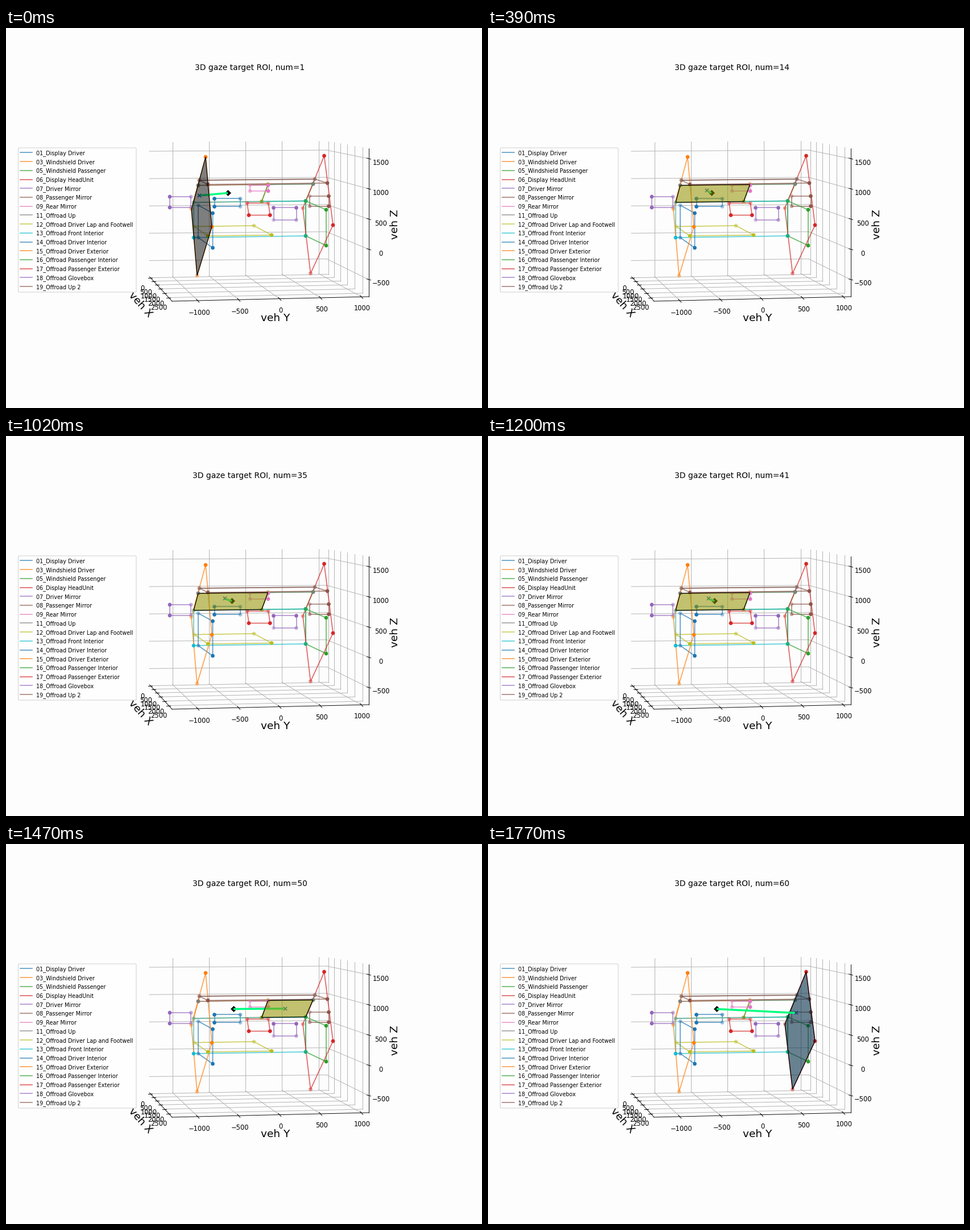
These frames come from a looping animation (837 by 669 pixels, 1800 ms). A matplotlib script:

```python
import matplotlib.pyplot as plt
import numpy as np
from matplotlib.animation import FuncAnimation
from matplotlib.patches import FancyBboxPatch, Polygon

W, H, DPI = 837, 669, 83
FRAMES, INTERVAL = 60, 30

plt.rcParams["font.family"] = "DejaVu Sans"
fig = plt.figure(figsize=((W + 0.01) / DPI, (H + 0.01) / DPI), dpi=DPI,
                 facecolor="#fdfdfd")
ax = fig.add_axes([0, 0, 1, 1])
ax.set(xlim=(0, W), ylim=(H, 0))
ax.axis("off")


def line(p, q, color="#b0b0b0", lw=0.8, z=1, **kw):
    ax.plot([p[0], q[0]], [p[1], q[1]], color=color, lw=lw, zorder=z, **kw)


def label(x, cy, s, size=10, ha="center"):
    """Text whose capitals are centred on cy."""
    return ax.text(x, cy + 0.365 * size * DPI / 72, s, size=size, ha=ha,
                   va="baseline", zorder=9)


def mix(p, q, t):
    return np.add(p, np.multiply(np.subtract(q, p), t))


def smooth(n, start, end):
    t = np.clip((n - start) / (end - start), 0, 1)
    return t * t * (3 - 2 * t)


# Corners of the box: floor and the tops of the two walls
BACK_L, BACK_R = (252.5, 438), (564, 432)
FRONT_L, FRONT_R = (292, 481), (637.5, 473)
TOP_L, TOP_R, TOP_F = (252.5, 201), (564, 199), (637.5, 212)


def draw_axes():
    # z levels run along both walls
    for i in range(5):
        left, mid, right = 217 + 48.1 * i, 215 + 47.9 * i, 230 + 53.2 * i
        line((252, left), (564, mid))
        line((564, mid), (637.5, right))
        line((634.5, right - 1), (641.5, right + 1), "k")
        label(659, 236.3 + 54 * i - 0.2 * i * i,
              f"{1500 - 500 * i}".replace("-", "−"))
    # y positions on the back wall and floor
    for i in range(5):
        t = (40 + 64.3 * i) / 311.5
        top, back = mix(TOP_L, TOP_R, t), mix(BACK_L, BACK_R, t)
        front = mix(FRONT_L, FRONT_R, 0.131 + 0.2083 * i)
        line(top, back)
        line(back, front)
        line(front - (2.5, 2.5), front + (2.5, 3), "k")
        label(339.7 + 71.7 * i, 501 - 2 * i,
              f"{500 * i - 1000}".replace("-", "−"))
    # x positions on the floor and right wall
    for i in range(6):
        t = 0.04 + 0.134 * i + 0.0057 * i * i
        left, right = mix(BACK_L, FRONT_L, t), mix(BACK_R, FRONT_R, t)
        line(left, right)
        line(right, mix(TOP_R, TOP_F, t))
        line(left - (4, 0), left + (3, 0), "k")
        label(240 + 5.8 * i, 457.5 + 6.9 * i, str(500 * i))
    for p, q in [(BACK_L, FRONT_L), (FRONT_L, FRONT_R), (FRONT_R, TOP_F)]:
        line(p, q, "k")
    label(473.5, 509.5, "veh Y", 16)
    ax.text(684, 346, "veh Z", size=16, rotation=90, ha="center", va="center")
    ax.text(236.5, 487.5, "veh X", size=16, rotation=-48, ha="center",
            va="center", rotation_mode="anchor", zorder=9)


def panel(x, y, w, h, near, skew=0):
    """Small four-sided panel, its corners listed from the near side on."""
    pts = [(x, y), (x + w, y), (x + w + skew, y + h), (x + skew, y + h)]
    k = ["top", "right", "bottom", "left"].index(near)
    return pts[k:] + pts[:k]


# Cabin corners shared between regions
DASH_L, DASH_R = (330, 307), (527, 304.5)
FLOOR_L, FLOOR_R = (330, 369), (527, 366)
HEAD_L, HEAD_R = (338, 277), (540, 274.5)
ROOF_L, ROOF_R = (340, 268), (543, 266)
REAR_L, REAR_R = (355, 275.5), (565, 273)
SPLIT = 0.607
HEAD_M, DASH_M = mix(HEAD_L, HEAD_R, SPLIT), mix(DASH_L, DASH_R, SPLIT)

# Each outline starts with its two nearest corners
REGIONS = {
    "01_Display Driver": panel(366.5, 300.5, 45.5, 14, "left"),
    "03_Windshield Driver": [HEAD_L, HEAD_M, DASH_M, DASH_L],
    "05_Windshield Passenger": [HEAD_R, DASH_R, DASH_M, HEAD_M],
    "06_Display HeadUnit": panel(424, 308.3, 37.3, 21.2, "bottom", skew=3),
    "07_Driver Mirror": panel(288, 297, 37.3, 19, "left"),
    "08_Passenger Mirror": panel(534, 296, 33.5, 17.7, "right"),
    "09_Rear Mirror": panel(429, 276.7, 32, 10.3, "right"),
    "11_Offroad Up": [HEAD_L, HEAD_R, ROOF_R, ROOF_L],
    "12_Offroad Driver Lap and Footwell":
        [REAR_L + np.array([0, 90.5]), (467, 364.5), (436, 348), (331, 349.5)],
    "13_Offroad Front Interior": [FLOOR_L, FLOOR_R, DASH_R, DASH_L],
    "14_Offroad Driver Interior":
        [(363.5, 326), (363.5, 387), (338, 369), (338, 312)],
    "15_Offroad Driver Exterior":
        [(351, 227), (362, 350), (336, 436), (326, 319)],
    "16_Offroad Passenger Interior":
        [(563, 320), (563, 383), FLOOR_R, DASH_R],
    "17_Offroad Passenger Exterior":
        [(559.5, 225), (575, 347), (535.5, 432), (522, 317)],
    "18_Offroad Glovebox": panel(470.5, 316.5, 40, 21.5, "top"),
    "19_Offroad Up 2": [REAR_R, REAR_L, ROOF_L, ROOF_R],
}
SHADE = (1, 1, 0.5, 0.4)


def draw_regions():
    ax.add_patch(FancyBboxPatch(
        (21.5, 211), 207.5, 254, boxstyle="round,pad=0,rounding_size=2",
        fc=(1, 1, 1, 0.8), ec=(0.8, 0.8, 0.8, 0.8), lw=1, zorder=7))
    for i, (name, pts) in enumerate(REGIONS.items()):
        color = f"C{i % 10}"
        ax.add_patch(Polygon(pts, fill=False, ec=color, lw=1.5, alpha=0.7,
                             zorder=2))
        ax.scatter(*zip(*pts), s=34, color=color, alpha=SHADE, lw=0, zorder=3)
        y = 219.5 + 15.71 * i
        line((24.5, y), (45.5, y), color, 1.5, 8, alpha=0.7)
        label(53, y, name, 8.4, ha="left")


draw_axes()
draw_regions()

title = label(428.7, 69, "", 12)
face = ax.add_patch(Polygon([(0, 0)], ec="k", lw=1, zorder=5))
ray, = ax.plot([], [], color="springgreen", lw=3, solid_capstyle="butt")
eye, = ax.plot([], [], "kD", ms=6.2, mew=0.5)
hit, = ax.plot([], [], "x", color="C0", ms=6, mew=1.5, zorder=4)

OLIVE = (0.572, 0.572, 0, 0.56)


def region_at(x):
    """Name and face colour of the region that the gaze meets at x."""
    if x < 346:
        return "15_Offroad Driver Exterior", (0, 0, 0, 0.5)
    if x < 456:
        return "03_Windshield Driver", OLIVE
    if x < 532:
        return "05_Windshield Passenger", OLIVE
    return "17_Offroad Passenger Exterior", (0.02, 0.18, 0.28, 0.6)


def update(i):
    n = i + 1
    # the gaze settles on the windshield, then sweeps to the passenger side
    settle, sweep = smooth(n, 1, 11), smooth(n, 39.7, 56.4)
    a = np.array([390 + 12 * i / (FRAMES - 1), 290.5])
    b = np.array([340 + 45 * settle + 157 * sweep,
                  295 - 8.5 * settle + 11 * sweep ** 3])
    name, color = region_at(b[0])
    face.set_xy(REGIONS[name])
    face.set_facecolor(color)
    tip = b - 2.5 * (b - a) / np.hypot(*(b - a))
    ray.set_data([a[0], tip[0]], [a[1], tip[1]])
    eye.set_data([a[0]], [a[1]])
    hit.set_data([b[0]], [b[1]])
    # only the passenger window lies behind the ray
    z = 6 if name.startswith("17") else 4.5
    eye.set_zorder(z)
    ray.set_zorder(z + 0.1)
    title.set_text(f"3D gaze target ROI, num={n}")
    return title, face, ray, eye, hit


anim = FuncAnimation(fig, update, frames=FRAMES, interval=INTERVAL,
                     repeat=True, repeat_delay=0, blit=False)
plt.show()
```
